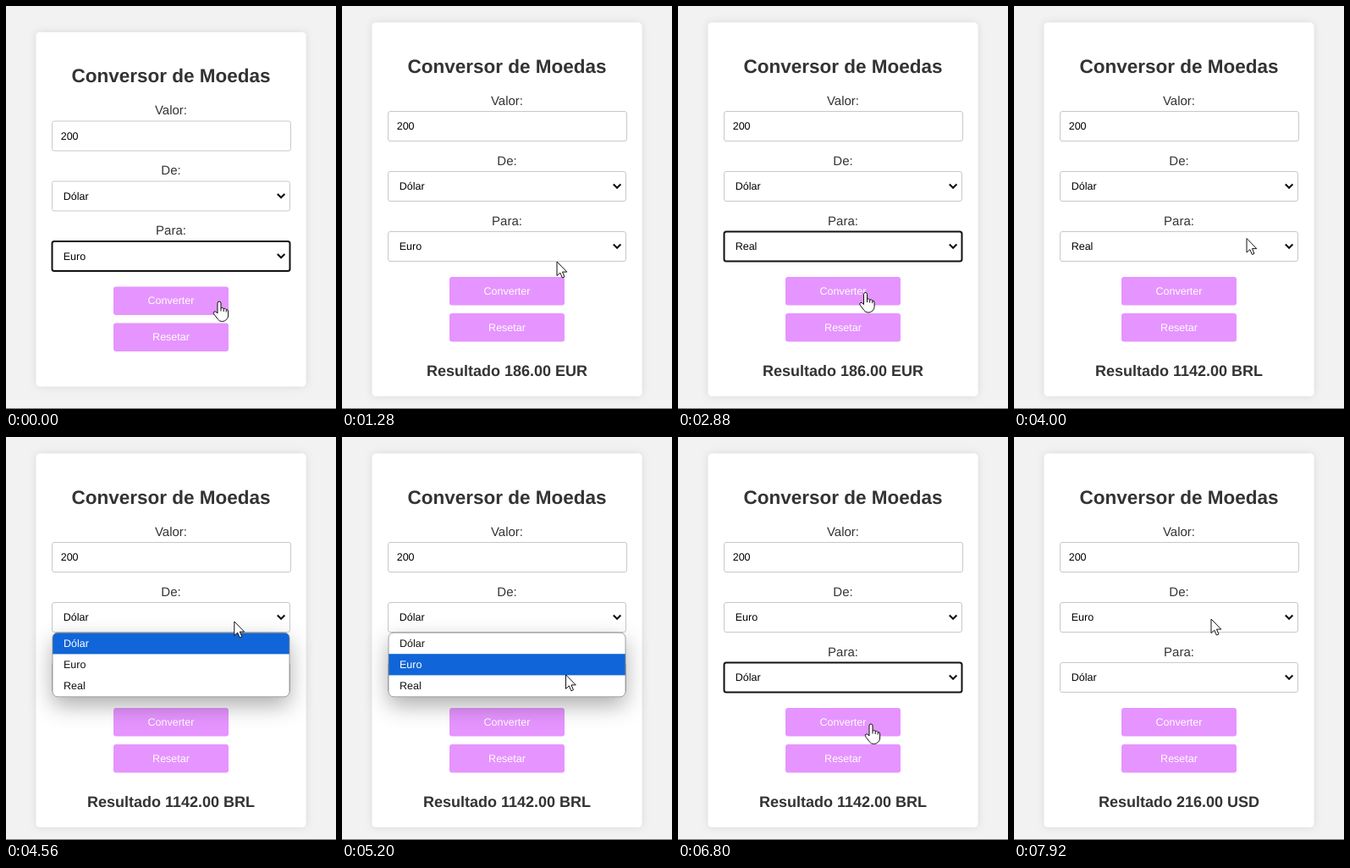
These frames come from a looping animation (390 by 476 pixels, 8 s). An HTML page:

```html
<!DOCTYPE html>
<html lang="pt">
<head>
<meta charset="utf-8">
<title>Conversor de Moedas</title>
<style>
html, body { margin: 0; width: 100%; height: 100%; overflow: hidden; background: #f2f2f2; }
svg { display: block; width: 390px; height: 476px; }
text { font: 12.5px "Liberation Sans", Arial, sans-serif; text-rendering: geometricPrecision; }
.mid { text-anchor: middle; }
.title { font-size: 22.5px; font-weight: bold; fill: #333; }
.label { font-size: 15px; fill: #333; }
.result { font-size: 18px; font-weight: bold; fill: #333; }
.button { fill: #e694ff; }
.caption { fill: #fff; }
.field { fill: #fff; stroke: #c8c8c8; stroke-width: 1; }
.field.focus { stroke: #101010; stroke-width: 2; }
.chevron { fill: none; stroke: #111; stroke-width: 2.1; }
#card { filter: drop-shadow(0 0 4.7px rgba(0, 0, 0, .1)); }
#sheet { filter: drop-shadow(0 10px 13px rgba(0, 0, 0, .32)); }
#arrow, #hand { fill: #fff; stroke: #111; stroke-width: 1; stroke-linejoin: round; }
</style>
</head>
<body>
<svg viewBox="0 0 390 476">
  <defs><clipPath id="round"><rect x="55" width="280" height="76" rx="6"/></clipPath></defs>
  <rect width="390" height="476" fill="#f2f2f2"/>
  <rect id="card" x="35.5" width="319" rx="4.5" fill="#fff"/>
  <g id="form"></g>
  <text id="result" class="mid result" x="195" y="437"></text>
  <g id="popup">
    <rect id="sheet" x="55" width="280" height="76" rx="6" fill="#fff"/>
    <g clip-path="url(#round)"><rect id="mark" x="55" width="280" height="25.2" fill="#1065d8"/></g>
    <rect x="55" y=".2" width="280" height="75.6" rx="6" fill="none" stroke="#8b8b8b" stroke-width=".8"/>
    <g id="rows"></g>
  </g>
  <path id="arrow" d="M0 0V16.6L3.8 13.1L6.4 19L9 17.9L6.5 12.1H11.8Z"/>
  <g id="hand">
    <path d="M-2 2Q-2 0 0 0Q2 0 2 2V8Q4 6.4 5.2 8.5Q7.2 7.5 8.2 9.6Q10.6 9 10.6 12V17Q10.4 19.5 8.6 21.3Q6.5 23.6 3.5 23.6Q0 23.6-1.6 21L-6 15.3Q-7.4 13-6 12Q-4.5 11-2 14Z"/>
    <path d="M2 8V11.5M5.2 8.5V12M8.2 9.6V12.6" fill="none"/>
  </g>
  <rect y="475" width="390" height="1" fill="#777"/>
</svg>
<script>
const LOOP = 8000, TICK = 80, ROW = 25;
const COINS = ['Dólar', 'Euro', 'Real'];
const $ = id => document.getElementById(id);

function add(parent, tag, attrs, text = '') {
  const el = document.createElementNS('http://www.w3.org/2000/svg', tag);
  for (const key in attrs) el.setAttribute(key, attrs[key]);
  el.textContent = text;
  return parent.appendChild(el);
}

const form = $('form');
const centered = (cls, y, text) => add(form, 'text', { class: 'mid ' + cls, x: 195, y }, text);
const field = (y, width) => add(form, 'rect', { class: 'field', x: 54.5, y, width, height: 35, rx: 2.5 });

function select(y) {
  const box = field(y, 281);
  const value = add(form, 'text', { x: 67.7, y: y + 21.5 });
  add(form, 'path', { class: 'chevron', d: `M320.8 ${y + 15}l4.3 4.3 4.3-4.3` });
  return { y, box, value };
}

function button(y, text) {
  add(form, 'rect', { class: 'button', x: 127, y, width: 136, height: 33.5, rx: 3 });
  centered('caption', y + 20.9, text);
}

centered('title', 78.5, 'Conversor de Moedas');
centered('label', 116.9, 'Valor:');
field(124.5, 282);
add(form, 'text', { x: 64.7, y: 146 }, '200');
centered('label', 187.7, 'De:');
const from = select(195.5);
centered('label', 258.7, 'Para:');
const to = select(266.5);
button(320, 'Converter');
button(363, 'Resetar');
const rows = COINS.map((name, i) => add($('rows'), 'text', { x: 68, y: 17 + i * ROW }, name));

// Pointer stops: time, x, y
const path = [
  [0, 252, 349], [480, 252, 349], [1280, 254, 302], [1520, 257, 288], [1640, 257, 288],
  [2160, 252, 364], [2320, 252, 364], [2880, 221.5, 338.5], [3280, 221.5, 338.5],
  [4000, 275, 274.5], [4320, 270, 216], [4480, 270, 216], [5200, 264.5, 280.8],
  [5360, 264.5, 280.8], [5560, 264.5, 286], [5680, 264.5, 286], [5920, 264.5, 308.5],
  [6160, 264.5, 308.5], [6720, 228, 339], [7200, 228, 339], [7920, 233, 215], [LOOP, 233, 215]
];

// State changes in order of time
const steps = [
  [0, { from: 0, to: 1, focus: to, open: null, result: '' }],
  [320, { focus: null }],
  [400, { result: '186.00 EUR' }],
  [1600, { open: to }],
  [2240, { open: null, to: 2, focus: to }],
  [3040, { focus: null }],
  [3120, { result: '1142.00 BRL' }],
  [4400, { open: from }],
  [5360, { open: null, from: 1, focus: from }],
  [5600, { open: to, focus: null }],
  [6080, { open: null, to: 0, focus: to }],
  [6960, { focus: null }],
  [7120, { result: '216.00 USD' }]
];

function pointer(t) {
  const i = path.findIndex(p => p[0] > t);
  const [t0, x0, y0] = path[i - 1], [t1, x1, y1] = path[i];
  const k = (1 - Math.cos(Math.PI * (t - t0) / (t1 - t0))) / 2;
  return [x0 + (x1 - x0) * k, y0 + (y1 - y0) * k];
}

const show = (el, on) => el.setAttribute('display', on ? 'inline' : 'none');
const move = (el, x, y) => el.setAttribute('transform', `translate(${x} ${y})`);

function draw(t) {
  const state = Object.assign({}, ...steps.filter(s => s[0] <= t).map(s => s[1]));
  const [x, y] = pointer(t);
  const shift = state.result ? 0 : 11.5;

  $('card').setAttribute('y', 19.5 + shift);
  $('card').setAttribute('height', 441.5 - 2 * shift);
  move(form, 0, shift);
  $('result').textContent = state.result && 'Resultado ' + state.result;
  from.value.textContent = COINS[state.from];
  to.value.textContent = COINS[state.to];
  for (const s of [from, to]) s.box.classList.toggle('focus', state.focus === s);

  const open = state.open;
  show($('popup'), open);
  if (open) {
    const top = open.y + 35.5;
    const chosen = open === from ? state.from : state.to;
    const row = y < top ? chosen : Math.min(2, Math.floor((y - top) / ROW));
    move($('popup'), 0, top);
    $('mark').setAttribute('y', row * ROW + .2);
    rows.forEach((r, i) => r.setAttribute('fill', i === row ? '#fff' : '#111'));
  }

  const by = y - shift;
  const onButton = !open && x > 127 && x < 263 && (by > 320 && by < 353.5 || by > 363 && by < 396.5);
  show($('hand'), onButton);
  show($('arrow'), !onButton);
  move($(onButton ? 'hand' : 'arrow'), x, y);
}

const start = performance.now();
function frame() {
  const t = (performance.now() - start) % LOOP;
  draw(Math.floor(t / TICK) * TICK);
  requestAnimationFrame(frame);
}
frame();
</script>
</body>
</html>
```
